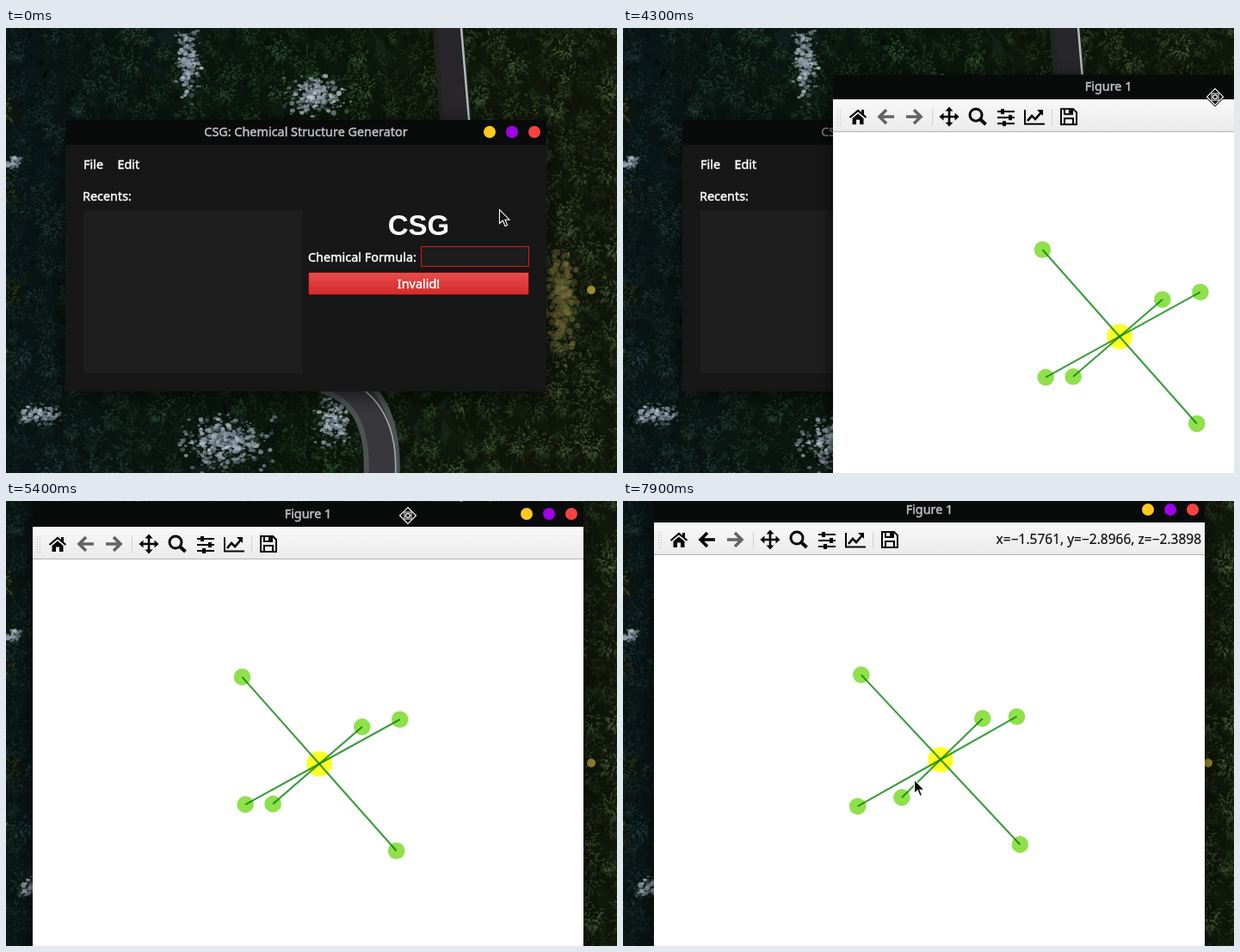
Recreate the animation shown at these times as an HTML page with a canvas. Size 710x518 px, loop 8 s.

```html
<!DOCTYPE html>
<html lang="en">
<head>
<meta charset="utf-8">
<title>Chemical Structure Generator</title>
<style>
  html, body { margin: 0; width: 100%; height: 100%; overflow: hidden; background: #14211a; }
  canvas { display: block; width: 710px; height: 518px; }
</style>
</head>
<body>
<canvas id="stage" width="710" height="518"></canvas>
<script>
const W = 710, H = 518, LOOP = 8000, STEP = 100;
const stage = document.getElementById('stage').getContext('2d');
const SANS = '"Noto Sans", "Open Sans", sans-serif';
const LABEL = `14.4px ${SANS}`, FIELD = `15.5px ${SANS}`;
let g = stage;

// ---------- helpers ----------
let seed = 7;
function rnd(a = 0, b = 1) {
  seed = (seed * 1664525 + 1013904223) % 4294967296;
  return a + (b - a) * seed / 4294967296;
}
const bell = spread => (rnd() + rnd() + rnd() - 1.5) / 1.5 * spread;
const mix = (a, b, k) => a + (b - a) * k;

// Position on a path of [time, x, y] stops, slowing down into each stop.
function glide(stops, t) {
  let i = 0;
  while (i < stops.length - 2 && t >= stops[i + 1][0]) i++;
  const [[t0, x0, y0], [t1, x1, y1]] = stops.slice(i);
  const k = Math.min(1, Math.max(0, (t - t0) / (t1 - t0)));
  const eased = 1 - (1 - k) ** 3.2;
  return [mix(x0, x1, eased), mix(y0, y1, eased)];
}
function rect(x, y, w, h, fill) {
  g.fillStyle = fill;
  g.fillRect(x, y, w, h);
}
function disc(x, y, r, fill, squash = 1) {
  g.fillStyle = fill;
  g.beginPath();
  g.ellipse(x, y, r, r * squash, 0, 0, 7);
  g.fill();
}
// The interface face is a little heavier than regular, hence the hairline.
function text(str, x, y, color, font = LABEL, align = 'left', hairline = 0.45) {
  g.font = font;
  g.textAlign = align;
  g.fillStyle = g.strokeStyle = color;
  g.lineWidth = hairline;
  g.fillText(str, x, y);
  if (hairline) g.strokeText(str, x, y);
}
function stroke(path, color, width) {
  g.strokeStyle = color;
  g.lineWidth = width;
  g.stroke(new Path2D(path));
}
function fill(path, color) {
  g.fillStyle = color;
  g.fill(new Path2D(path));
}
function vertical(y0, y1, top, bottom) {
  const grad = g.createLinearGradient(0, y0, 0, y1);
  grad.addColorStop(0, top);
  grad.addColorStop(1, bottom);
  return grad;
}
function at(x, y, draw) {
  g.save();
  g.translate(x, y);
  draw();
  g.restore();
}

// ---------- forest backdrop ----------
// A conifer from above: dark skirt, then small dabs that brighten towards the tip.
function tree(x, y, r) {
  const k = Math.min(1, x / W * 1.1), hue = mix(188, 92, k ** 0.6), tone = rnd(0.6, 1.3);
  disc(x + 2, y + r * 0.35, r * 1.05, `hsla(${hue}, 38%, 6%, .75)`, 1.1);
  for (let i = 0; i < 110; i++) {
    const a = rnd(0, 6.283), d = Math.sqrt(rnd()) * (0.75 + 0.25 * Math.cos(a * 9));
    const light = mix(15, 22, k) * tone * (1.15 - 0.65 * d) * rnd(0.7, 1.35);
    const dx = Math.cos(a) * d * r, dy = Math.sin(a) * d * r * 1.15;
    g.strokeStyle = `hsla(${hue + rnd(-8, 8)}, 25%, ${light - 5 * dy / r}%, .75)`;
    g.lineWidth = rnd(1, 2.4);
    g.beginPath();
    g.moveTo(x + dx * 0.75, y + (dy + r * 0.3) * 0.75 - r * 0.3);
    g.lineTo(x + dx, y + dy);
    g.stroke();
  }
}
function snow(x, y, sx, sy) {
  for (let i = 0; i < sx * sy / 5; i++)
    disc(x + bell(sx), y + bell(sy), rnd(0.7, 3.2), `hsla(212, 14%, ${rnd(45, 82)}%, ${rnd(0.3, 0.8)})`, rnd(0.5, 1));
}
function makeForest() {
  const sheet = document.createElement('canvas');
  sheet.width = W;
  sheet.height = H;
  g = sheet.getContext('2d');
  const ground = g.createLinearGradient(0, 0, W, 0);
  ground.addColorStop(0, '#0a1920');
  ground.addColorStop(0.4, '#121f19');
  ground.addColorStop(1, '#182612');
  rect(0, 0, W, H, ground);
  for (let y = -10; y < H + 30; y += 23)
    for (let x = -10; x < W + 20; x += 30)
      tree(x + rnd(-13, 13), y + rnd(-10, 10), rnd(12, 27));

  for (let i = 0; i < 300; i++)
    disc(646 + bell(24), 320 + bell(85), rnd(1, 4), `hsla(${rnd(36, 70)}, 35%, ${rnd(22, 40)}%, .45)`);
  disc(680, 305, 5, '#9a8a30');
  snow(212, 40, 18, 60);
  snow(360, 78, 48, 30);
  snow(255, 482, 64, 38);
  snow(380, 460, 26, 38);
  snow(40, 450, 34, 16);
  snow(10, 156, 14, 12);

  fill('M496 0H532L541 107H504Z', '#20251f');
  fill('M502 0H526L535 107H508Z', '#28262b');
  stroke('M529 0L538 107', '#b4bac2', 2.5);
  const road = 'M371 405Q444 425 436 530';
  stroke(road, '#4d5252', 42);
  stroke(road, '#38373b', 30);
  stroke('M386 405Q460 432 452 530', '#a4a9ad', 1.6);
  g = stage;
  return sheet;
}
const forest = makeForest();

// ---------- windows ----------
const TITLE_H = 29;

// (x, y) is the lower left corner of the title bar.
function windowFrame(x, y, w, h, title, active, body) {
  g.save();
  g.shadowColor = 'rgba(0,0,0,.6)';
  g.shadowBlur = 23;
  g.shadowOffsetY = 5;
  g.fillStyle = '#090b0a';
  g.beginPath();
  g.roundRect(x, y - TITLE_H, w, h + TITLE_H, [4, 4, 0, 0]);
  g.fill();
  g.restore();
  rect(x, y, w, h, body);
  text(title, x + w / 2, y - 10, active ? '#bfc3c7' : '#737678', LABEL, 'center');
  ['#fbca1c', '#a200e8', '#f94340'].forEach((c, i) => disc(x + w - 66 + 26 * i, y - 15, 7, c));
}

function mainWindow(t) {
  const typed = 'SF6'.slice(0, (t >= 700) + (t >= 1500) + (t >= 2000));
  const valid = t >= 2000;
  windowFrame(69, 136, 559, 287, 'CSG: Chemical Structure Generator', t < 3300, '#171717');
  text('File', 90, 164, '#fff');
  text('Edit', 129.5, 164, '#fff');
  text('Recents:', 89, 201, '#fff');
  rect(90, 212, 254, 190, '#1e1e1e');
  text('CSG', 479.5, 241, '#fff', 'bold 33px "Liberation Sans", Arial, sans-serif', 'center', 0);
  text('Chemical Formula:', 351, 272, '#fff');

  rect(482, 254, 126, 24, valid ? '#1f7a24' : '#e01818');
  rect(483, 255, 124, 22, '#1d1d1d');
  text(typed, 485.5, 272, '#fff', FIELD);
  if (t >= 300) rect(Math.round(486 + g.measureText(typed).width), 257, 1, 19, '#fff');

  const hover = t >= 2700 && t < 3300, pressed = t === 3000;
  const hue = valid ? 120 : 0, light = (valid ? 52 : 58) + 5 * hover - 16 * pressed;
  g.fillStyle = `hsl(${hue}, 70%, 22%)`;
  g.beginPath();
  g.roundRect(351, 284, 257, 27, 3);
  g.fill();
  rect(352, 285, 255, 25, vertical(285, 310, `hsl(${hue}, 76%, ${light + 2}%)`, `hsl(${hue}, 66%, ${light - 8}%)`));
  text(valid ? 'Go!' : 'Invalid!', 479.5, 303, '#fff', LABEL, 'center');
}

const arrowIcon = color => stroke('M0-8L-8 0L0 8M-8 0H9', color, 3.6);
function toolbar(x, y, backActive) {
  const ink = '#050505', faded = '#646464';
  rect(x, y, 640, 38, vertical(y, y + 38, '#f8f8f8', '#ebebeb'));
  rect(x, y + 37, 640, 1, '#b2b2b2');
  for (let i = 0; i < 7; i++)
    for (const dx of [5, 8]) rect(x + dx, y + 11 + 3 * i, 1, 1, '#b8b8b8');
  for (const dx of [115, 254]) rect(x + dx, y + 11, 1, 19, '#cfcfcf');

  const icon = (dx, draw) => at(x + dx, y + 20, draw);
  icon(29, () => {
    stroke('M-9.5 1L0-7L9.5 1', ink, 2.2);
    fill('M-6.5 2L0-3.5L6.5 2V9H2V3.5H-2V9H-6.5ZM4-8H7V-1L4-3.5Z', ink);
  });
  icon(62, () => arrowIcon(backActive ? ink : faded));
  icon(94, () => { g.scale(-1, 1); arrowIcon(faded); });
  icon(135, () => {
    stroke('M-8 0H8M0-8V8', ink, 2.6);
    for (let i = 0; i < 4; i++) {
      fill('M0-11.5l4.5 5h-9z', ink);
      g.rotate(Math.PI / 2);
    }
  });
  icon(168, () => {
    stroke('M5-2A7 7 0 1 1-9-2A7 7 0 1 1 5-2Z', ink, 3);
    stroke('M3 3L9.5 9', ink, 4);
  });
  icon(201, () => {
    stroke('M-10-6H10M-10 1H10M-10 8H10', ink, 2);
    fill('M-6-9h4v6h-4zM3-2h4v6h-4zM-4 5h4v6h-4z', ink);
  });
  icon(234, () => {
    stroke('M-11-8V8.5H12', ink, 2);
    stroke('M-8 5L-3-1L1 3L8-5', ink, 2.6);
    fill('M3-8H10V-1Z', ink);
  });
  icon(274, () => {
    stroke('M-9-9H5L9-5V9H-9Z', ink, 2);
    stroke('M-5-9V-3H4V-9M-5 9V2H5V9', ink, 2);
    fill('M0-8H3V-4H0Z', ink);
  });
}

// ---------- pointer path and view angles ----------
const GRAB = 7000, RELEASE = 7500;
const TO_BUTTON = [[2400, 573, 211], [2800, 495, 301]];
const TO_PLOT = [[6200, 472, 12], [6900, 357, 326], [GRAB, 347, 327], [RELEASE, 464, 204], [7900, 338, 324]];
const WINDOW_PATH = [[4100, 501, 118], [5000, 36, 55], [5200, 23, 38], [5400, 31, 30], [6000, 36, 25]];

// Dragging across the square plot area turns the view by half a circle.
function viewAngles(t) {
  const [x, y] = t < GRAB ? [347, 327] : glide(TO_PLOT, Math.min(t, RELEASE - 1));
  const degrees = 180 / 370;
  return { azimuth: -60 - (x - 347) * degrees, elevation: 30 + (y - 327) * degrees };
}

// Octahedron: one bond along y, two diagonal ones in the xz plane.
const BONDS = [[1, 0, -1], [0, 1, 0], [1, 0, 1]];
function molecule(t) {
  const { azimuth, elevation } = viewAngles(t);
  const a = azimuth * Math.PI / 180, e = elevation * Math.PI / 180;
  const RADIUS = 103.5, HEIGHT = 87, CAMERA = 2000;
  const project = ([x, y, z], sign) => {
    const right = (y * Math.cos(a) - x * Math.sin(a)) * RADIUS * sign;
    const front = (x * Math.cos(a) + y * Math.sin(a)) * RADIUS * sign;
    const up = z * HEIGHT * sign;
    const scale = CAMERA / (CAMERA - front * Math.cos(e) - up * Math.sin(e));
    return [right * scale, (front * Math.sin(e) - up * Math.cos(e)) * scale];
  };
  const ends = BONDS.map(bond => [project(bond, 1), project(bond, -1)]);
  for (const [x, y] of ends.flat()) disc(x, y, 9.8, '#8fe04c');
  disc(0, 0, 14.8, '#ffff28');
  for (const [from, to] of ends) stroke(`M${from}L0 0L${to}`, 'rgba(0,128,0,.77)', 2.1);
}

function status(t) {
  if (t < 6400) return '';
  if (t > GRAB && t < RELEASE) {
    const { azimuth, elevation } = viewAngles(t);
    return `azimuth=${azimuth.toFixed(0)} deg, elevation=${elevation.toFixed(0)} deg`;
  }
  const turned = t >= RELEASE, [x, y] = glide(TO_PLOT, t);
  const dx = (x - (turned ? 338 : 347)) / 90, dy = (y - (turned ? 324 : 327)) / 90;
  const values = turned ? [-1.5761 + dx, -2.8966 - dy, -2.3898] : [-1.6095 + dx, 2.8073 - dy, -2.4435];
  return values.map((v, i) => 'xyz'[i] + '=' + v.toFixed(4).replace('-', '−')).join(', ');
}

function figureWindow(t, x, y) {
  windowFrame(x, y, 640, 518, 'Figure 1', true, '#fff');
  toolbar(x, y, t >= RELEASE);
  text(status(t), x + 636, y + 25, '#111', FIELD, 'right', 0.2);
  at(x + 333, y + 276, () => molecule(t));
}

// ---------- pointers ----------
function pointer([x, y]) {
  at(x, y, () => {
    const shape = 'M.5.5V16.5L4.3 13L7 19.5L9.6 18.4L6.9 12.2H12Z';
    fill(shape, '#080808');
    stroke(shape, '#fff', 1.1);
  });
}
function moveCursor(x, y) {
  at(x, y, () => {
    const diamond = 'M0-9.5L9.5 0L0 9.5L-9.5 0Z';
    stroke(diamond, '#0a0a0a', 3);
    fill(diamond, '#0a0a0a');
    stroke(diamond, '#f4f4f4', 1.2);
    stroke('M-4-4H4V4H-4Z', '#f4f4f4', 1);
    stroke('M2.4 0A2.4 2.4 0 1 1-2.4 0A2.4 2.4 0 1 1 2.4 0Z', '#f4f4f4', 1.2);
  });
}

function render(t) {
  g.drawImage(forest, 0, 0);
  mainWindow(t);
  const [x, y] = glide(WINDOW_PATH, t);
  if (t >= 3300) figureWindow(t, x, y);
  if (t < 3500) pointer(glide(TO_BUTTON, t));
  else if (t >= 6300) pointer(glide(TO_PLOT, t));
  else if (t >= 4200) {
    const slip = Math.min(1, Math.max(0, (t - 4600) / 800));
    moveCursor(x + 444 - 8 * slip, y - 3 - 10 * slip);
  }
}

function tick() {
  render(Math.floor(performance.now() % LOOP / STEP) * STEP);
  requestAnimationFrame(tick);
}
tick();
</script>
</body>
</html>
```
